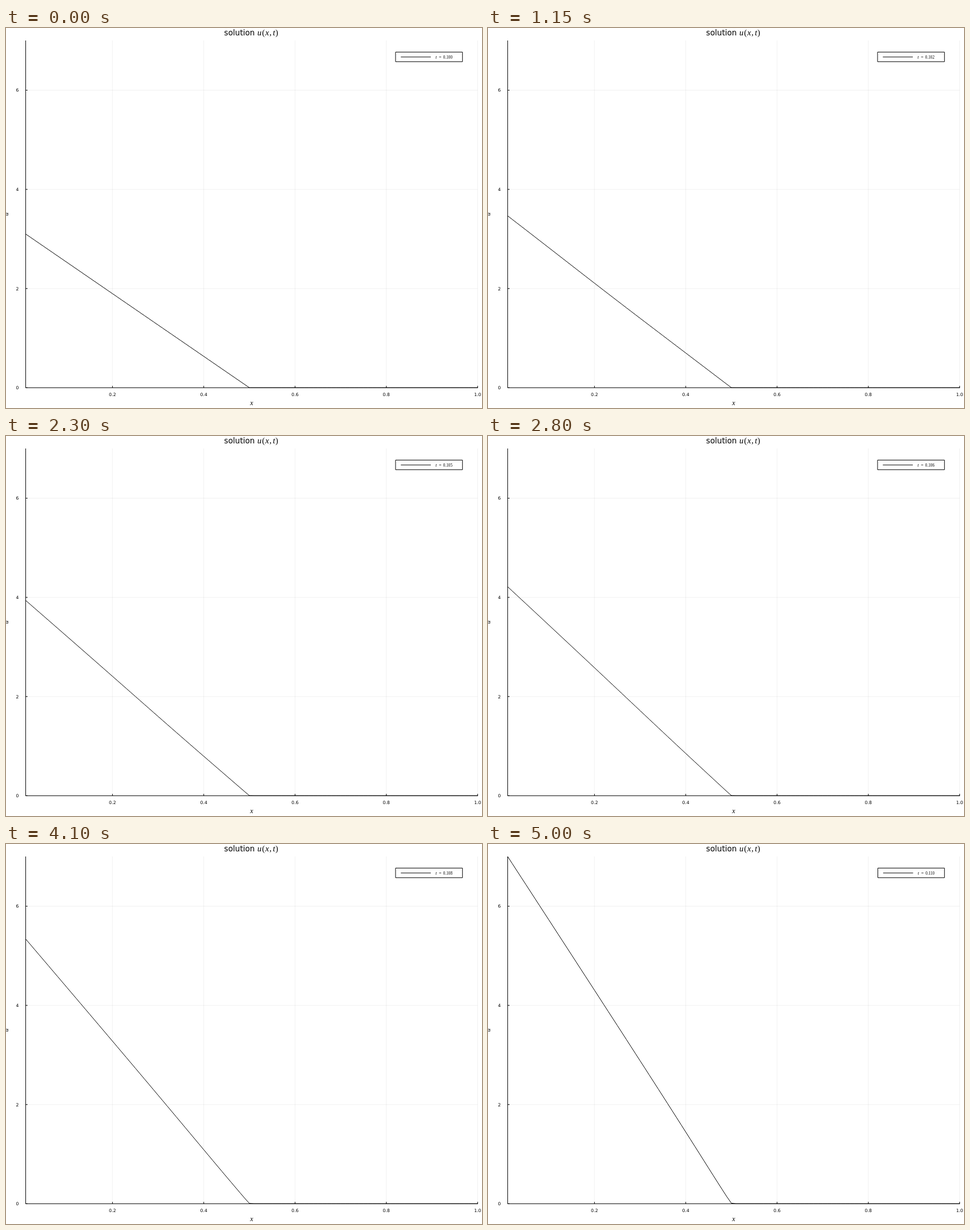
An HTML page for the animation above (5.05 s loop, 837 by 669 pixels).

```html
<!DOCTYPE html>
<html lang="en">
<head>
<meta charset="utf-8">
<title>Solution u(x, t)</title>
<style>
  html, body { margin: 0; width: 100%; height: 100%; overflow: hidden; background: #fff; }
  svg { display: block; }
  text { font-family: "DejaVu Sans", sans-serif; font-size: 7.75px; }
  .math { font-family: "Liberation Serif", serif; }
  .var { font-style: italic; }
  .line { fill: none; stroke: #000; stroke-width: 1; }
  .grid { fill: none; stroke: #000; stroke-opacity: .06; stroke-width: 1; }
</style>
</head>
<body>
<svg width="837" height="669" viewBox="0 0 837 669">
  <path class="grid" id="grid"/>
  <path class="line" id="axes"/>
  <g id="labels"></g>

  <text x="383.6" y="13" style="font-size:13.6px">solution</text>
  <g class="title">
    <text class="math var" x="442" y="13" style="font-size:14.5px">u</text>
    <text class="math" x="450.3" y="13" style="font-size:14.5px">(</text>
    <text class="math var" x="456" y="13" style="font-size:14.5px">x</text>
    <text class="math" x="463.2" y="13" style="font-size:14.5px">,</text>
    <text class="math var" x="469.3" y="13" style="font-size:14.5px">t</text>
    <text class="math" x="473.8" y="13" style="font-size:14.5px">)</text>
  </g>
  <text class="math var" x="431.8" y="664" text-anchor="middle" style="font-size:12px">x</text>
  <text class="math var" transform="translate(4 327.5) rotate(-90)" text-anchor="middle" style="font-size:11.5px">u</text>

  <path class="line" id="curve" stroke-linejoin="round"/>

  <path class="line" id="frame"/>
  <g id="legend">
    <path class="line" d="M694.3 51H747"/>
    <text class="math var" x="755.3" y="54.3">t</text>
    <text class="math" x="761.2" y="54.3">=</text>
    <text class="math" id="time" x="768.8" y="54.3" style="font-size:7.2px"></text>
  </g>
</svg>
<script>
const $ = id => document.getElementById(id);
const px = x => 829.3 - 802.6 * (1 - x);
const py = u => 633.3 - 87.29 * u;

const LEFT = 34.6, RIGHT = 829.3, TOP = 22, BOTTOM = 633.3;
const FRAMES = 101, FRAME_MS = 50;

function drawAxes() {
  let grid = '', axes = `M${LEFT} ${TOP}V${BOTTOM}H${RIGHT + .5}`, labels = '';
  for (const x of [.2, .4, .6, .8, 1]) {
    grid += `M${px(x)} ${TOP}V${BOTTOM}`;
    axes += `M${px(x)} ${BOTTOM}v-3.3`;
    labels += `<text x="${px(x)}" y="647.6" text-anchor="middle">${x.toFixed(1)}</text>`;
  }
  for (const u of [0, 2, 4, 6]) {
    if (u) grid += `M${LEFT} ${py(u)}H${RIGHT}`;
    axes += `M${LEFT} ${py(u)}h3.3`;
    labels += `<text x="22.5" y="${py(u) + 2.9}" text-anchor="end">${u}</text>`;
  }
  $('grid').setAttribute('d', grid);
  $('axes').setAttribute('d', axes);
  $('labels').innerHTML = labels;
}

// Nonlinear diffusion u_t = (u² u_x / 2)_x, driven by a boundary value that blows up at t = 0.1125.
function solve() {
  const cells = 100, dx = 1 / cells, dt = 5e-7, substeps = 200;
  const flux = (a, b, h) => (a + b) ** 2 / 8 * (a - b) / h;
  const u = Array.from({ length: cells }, (_, i) =>
    Math.sqrt(10) * Math.max(0, 1 - 2 * (i + 1) * dx));
  const curves = [];
  const toPath = () => 'M' + u.map((v, i) =>
    `${px((i + 1) * dx).toFixed(2)} ${py(v).toFixed(2)}`).join('L');

  curves.push(toPath());
  for (let n = 1, step = 0; n < FRAMES; n++) {
    for (let s = 0; s < substeps; s++) {
      const edge = Math.sqrt(.125 / (.0125 - step++ * dt));
      let inflow = flux(edge, u[0], dx / 2);
      for (let i = 0; i < cells; i++) {
        const outflow = i < cells - 1 ? flux(u[i], u[i + 1], dx) : 0;
        u[i] += dt / dx * (inflow - outflow);
        inflow = outflow;
      }
    }
    curves.push(toPath());
  }
  return curves;
}

drawAxes();
const curves = solve();
let shown = -1;

function render() {
  const n = Math.floor(performance.now() / FRAME_MS) % FRAMES;
  if (n !== shown) {
    shown = n;
    const label = ((1000 + n) / 1e4).toFixed(3);
    // The legend sits slightly further right for every third label.
    const shift = Math.round(label * 1000) % 3 === 2 ? .5 : 0;
    $('curve').setAttribute('d', curves[n]);
    $('time').textContent = label;
    $('frame').setAttribute('d', `M${685 + shift} 42.4H802.7V59.3H${685 + shift}Z`);
    $('legend').setAttribute('transform', `translate(${shift} 0)`);
  }
  requestAnimationFrame(render);
}
render();
</script>
</body>
</html>
```
